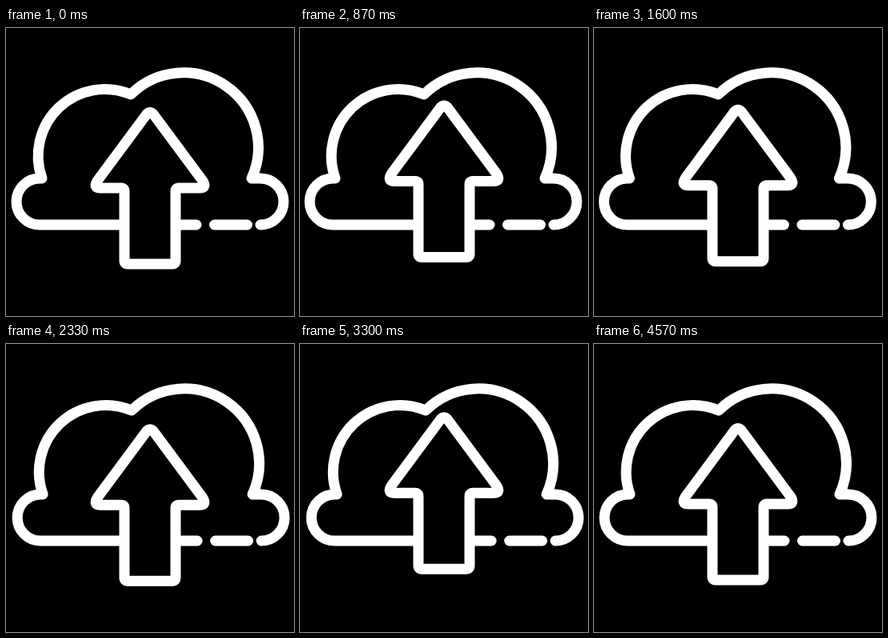
An HTML page that plays this animation: 360 by 360 pixels, repeating every 5.41 s.

```html
<!DOCTYPE html>
<html lang="en">
<head>
<meta charset="utf-8">
<title>Cloud upload</title>
<style>
  html, body { margin: 0; height: 100%; overflow: hidden; background: #000; }
  svg { display: block; width: 100%; height: 100%; }
  path { fill: #000; stroke: #fff; stroke-width: 13; stroke-linecap: round; stroke-linejoin: round; }
</style>
</head>
<body>
<svg viewBox="0 0 360 360">
  <path id="cloud" d="M238 246H42A29 29 0 0 1 42 188H45A83.5 83.5 0 0 1 156 83A93.5 93.5 0 0 1 307 188H318A29 29 0 0 1 318 246M260.5 246H301.5"/>
  <path id="arrow" d="M176 107.5Q180 103.5 184 107.5L245.5 190.5Q251.5 200 242.5 200H216Q212 200 212 204V291Q212 295 208 295H152Q148 295 148 291V204Q148 200 144 200H117.5Q108.5 200 114.5 190.5Z"/>
</svg>
<script>
  const LOOP = 5410, MOVE = 4570;
  const cloud = document.getElementById('cloud');
  const arrow = document.getElementById('arrow');

  // Arrow height as [time, offset], eased between neighbours
  const bob = [[0, 0], [645, -15], [1285, 8], [1925, -15], [2565, 8], [3205, -15], [3845, 8], [MOVE, 0]];

  function eased(keys, t) {
    const i = Math.max(1, keys.findIndex(k => k[0] >= t));
    const [t0, a] = keys[i - 1], [t1, b] = keys[i];
    return a + (b - a) * (1 - Math.cos(Math.PI * (t - t0) / (t1 - t0))) / 2;
  }

  function draw(now) {
    const t = Math.min(now % LOOP, MOVE);
    const sway = 1.2 * Math.sin(9 * Math.PI * t / MOVE);
    cloud.setAttribute('transform', `translate(${sway} 0)`);
    arrow.setAttribute('transform', `translate(0 ${eased(bob, t)})`);
  }

  const start = performance.now();
  function tick() {
    draw(performance.now() - start);
    requestAnimationFrame(tick);
  }
  tick();
</script>
</body>
</html>
```
